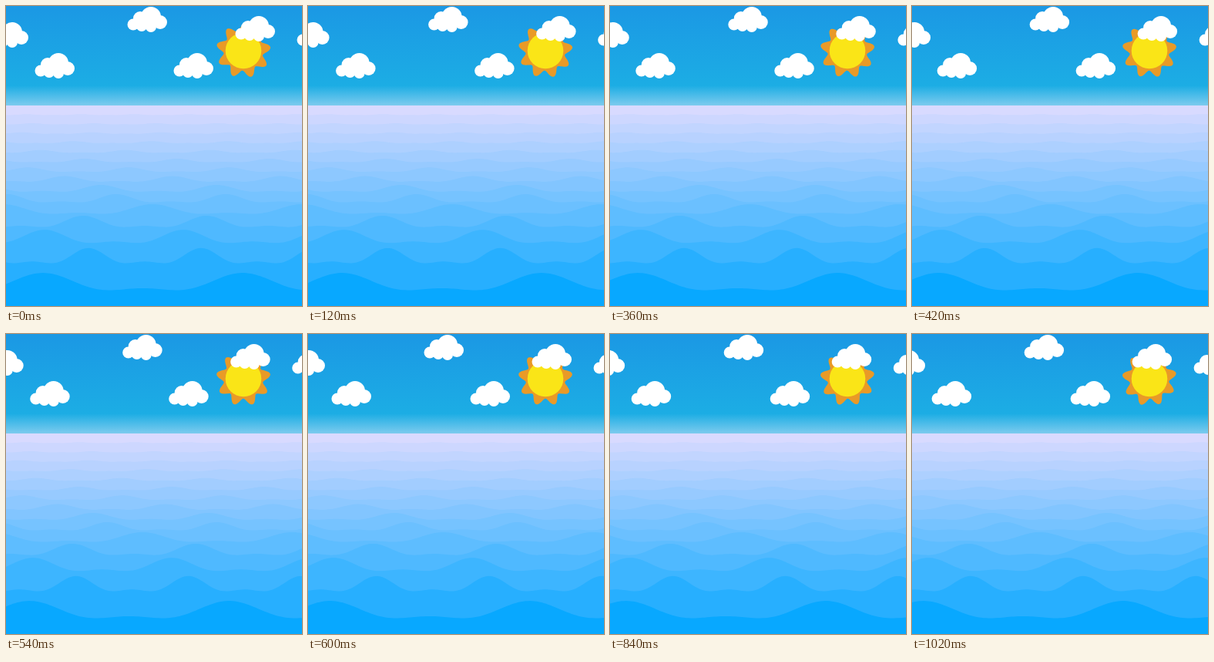
Write an HTML page with a canvas that moves like this. It is 384 px wide and 389 px high and loops after 1.14 s.

```html
<!DOCTYPE html>
<html lang="en">
<head>
<meta charset="utf-8">
<title>Sea and sun</title>
<style>
html, body { margin: 0; width: 100%; height: 100%; overflow: hidden; }
canvas { display: block; }
</style>
</head>
<body>
<canvas width="384" height="389"></canvas>
<script>
const W = 384, H = 389, HORIZON = 129, TAU = 2 * Math.PI;
const LOOP = 1140, STEP = 60, LAST = 17, LAYERS = 15;
const ctx = document.querySelector('canvas').getContext('2d');

const sky = ctx.createLinearGradient(0, 0, 0, HORIZON);
sky.addColorStop(0, '#1b98e4');
sky.addColorStop(0.8, '#1cade4');
sky.addColorStop(1, '#7ccbee');

const clouds = [[-23, 21], [37, 61], [157, 1], [217, 61], [297, 13], [377, 21]];
// Cloud puffs: x, y, radius
const puffs = [[8, 23, 7.5], [17, 15, 9], [31, 13, 13], [43, 20, 9], [19, 25, 7], [31, 26, 7]];
// Peak x and wavelength of the nearest waves, far to near
const swells = [[143, 142], [190, 194], [100, 160], [230, 180], [253, 146], [307, 259]];

function circle(x, y, r) {
  ctx.beginPath();
  ctx.arc(x, y, r, 0, TAU);
  ctx.fill();
}

// Even rows near the horizon, wider ones close to the viewer
function layerY(layer) {
  return HORIZON + 12 * layer + 52 * (layer / LAYERS) ** 8;
}

function seaColor(y) {
  const k = (y - HORIZON) / (layerY(LAYERS) - HORIZON);
  return `rgb(${216 - 208 * k}, ${218 - 50 * k}, 255)`;
}

function drawWave(layer, step) {
  const y = layerY(layer), height = 0.5 + 0.042 * layer * layer;
  const [peak, length] = swells[layer - LAYERS + swells.length - 1]
    || [97 * layer, 60 + 10 * layer];
  const shift = 0.13 * layer * step;
  ctx.fillStyle = seaColor(y);
  ctx.beginPath();
  ctx.moveTo(0, H);
  for (let x = 0; x <= W; x += 3) {
    const a = TAU * (x + shift - peak) / length;
    ctx.lineTo(x, y - height * (Math.cos(a) + 0.5 * Math.cos(2 * a)));
  }
  ctx.lineTo(W, H);
  ctx.fill();
}

function drawSun(step) {
  const cx = 308, cy = 58, turn = (-7 - step * 0.3) * TAU / 360;
  ctx.fillStyle = '#e99a27';
  ctx.beginPath();
  for (let a = 0; a < TAU; a += 0.03) {
    const r = 30.5 + 4.8 * Math.cos(9 * a);
    ctx.lineTo(cx + r * Math.cos(a + turn), cy + r * Math.sin(a + turn));
  }
  ctx.fill();
  ctx.fillStyle = '#fae517';
  circle(cx, cy, 23.3);
}

function draw(now) {
  const step = Math.min(LAST, Math.floor(now % LOOP / STEP));
  ctx.fillStyle = sky;
  ctx.fillRect(0, 0, W, HORIZON);
  drawSun(step);
  ctx.fillStyle = '#fff';
  for (const [x, y] of clouds)
    for (const [dx, dy, r] of puffs) circle(x + dx - 0.7 * step, y + dy, r);
  ctx.fillStyle = seaColor(HORIZON);
  ctx.fillRect(0, HORIZON, W, H - HORIZON);
  for (let layer = 1; layer <= LAYERS; layer++) drawWave(layer, step);
}

const start = performance.now();
function tick() {
  draw(performance.now() - start);
  requestAnimationFrame(tick);
}
tick();
</script>
</body>
</html>
```
